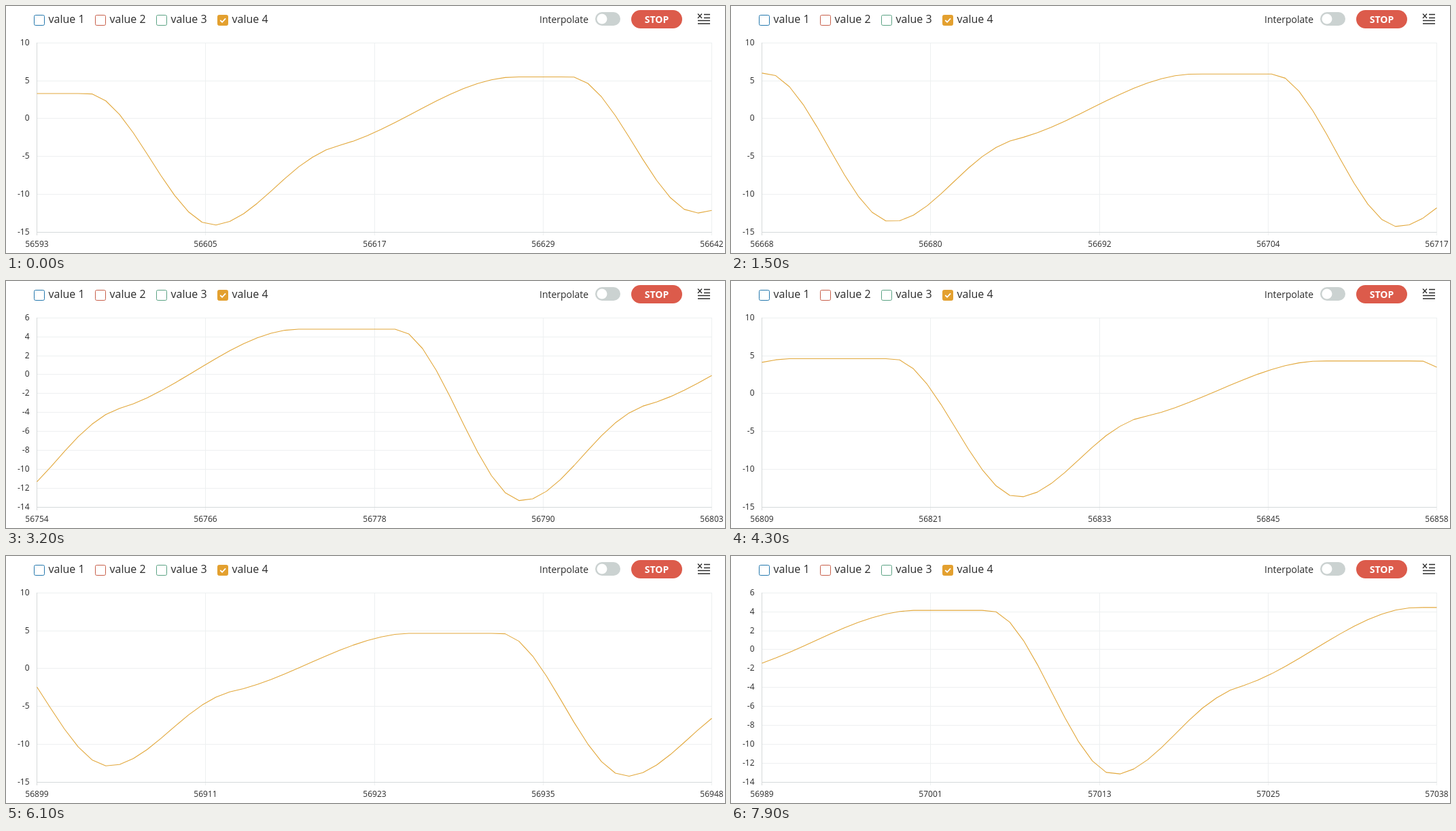
An HTML page for the animation above (8 s loop, 1058 by 364 pixels).

```html
<!DOCTYPE html>
<html lang="en">
<head>
<meta charset="utf-8">
<title>Live chart</title>
<style>
  html, body { margin: 0; width: 100%; height: 100%; overflow: hidden; background: #fff; }
  svg { display: block; font-family: "Open Sans", "Noto Sans", sans-serif; fill: #2b2b2b; }
  .box { fill: #fff; }
  .grid { stroke: #edf0f1; fill: none; }
  .axis { stroke: #d5d9da; fill: none; }
</style>
</head>
<body>
<svg width="1058" height="364" viewBox="0 0 1058 364">
  <g id="legend" font-size="16"></g>
  <text x="785" y="25" font-size="14">Interpolate</text>
  <rect x="867" y="9" width="37" height="20" rx="10" fill="#cbd2d1"/>
  <circle cx="877" cy="19" r="7.5" fill="#fff"/>
  <rect x="920" y="6" width="75" height="27" rx="13.5" fill="#dc5b4b"/>
  <text x="957.5" y="25" font-size="14" font-weight="700" text-anchor="middle" fill="#fff">STOP</text>
  <path d="M1018 11.5l6 6.5m0-6.5l-6 6.5M1027 12.5h9M1027 17.5h9M1018 21.5h18M1018 26h18" fill="none" stroke="#2b2b2b" stroke-width="1.3"/>
  <g id="chart" font-size="12"></g>
  <path id="curve" fill="none" stroke="#e2a83c" stroke-width="1.1" stroke-linejoin="round"/>
</svg>
<script>
const $ = id => document.getElementById(id);
const LEFT = 45.5, RIGHT = 1038.5, TOP = 54.3, HEIGHT = 278.7;
const FIRST = 56593, SHOWN = 50, STEP = 100, DURATION = 8000;

// Waves of the signal: sample of the dip after 56000, depth, shoulder level, plateau level.
const waves = [
  [568.5, -13.5, -4, 3.3],
  [605.8, -14.1, -4.1, 5.5],
  [640.9, -12.5, -3.9, 6],
  [677.4, -13.65, -3.2, 5.88],
  [714.2, -14.3, -3.5, 5.15],
  [751, -13.9, -4, 4.8],
  [789.2, -13.35, -3.65, 4.6],
  [827.6, -13.7, -3.5, 4.3],
  [865.9, -12.82, -3.6, 4.35],
  [904.2, -12.9, -3.4, 4.65],
  [941.8, -14.25, -4.3, 4.85],
  [978.2, -12, -2.5, 4.15],
  [1014.6, -13.2, -4.4, 4.45],
  [1051.5, -13, -4, 4.5]
];

// Smooth step from 0 to 1 that begins at `from` and takes `length` samples.
function ease(x, from, length) {
  const u = Math.max(0, Math.min(1, (x - from) / length));
  return u * u * (3 - 2 * u);
}

// Each wave climbs to its shoulder, then to its plateau, and drops into the next dip.
function level(sample) {
  const n = sample - 56000;
  const next = waves.findIndex(wave => wave[0] > n);
  const [start, dip, shoulder, plateau] = waves[next - 1];
  const [end, nextDip] = waves[next];
  return dip +
    (shoulder - dip) * ease(n, start, 9) +
    (plateau - shoulder) * ease(n, start + 7, 15) +
    (nextDip - plateau) * ease(n, end - 9.1, 9.1);
}

const text = (x, y, anchor, label) => `<text x="${x}" y="${y}" text-anchor="${anchor}">${label}</text>`;
const line = (cls, d) => `<path class="${cls}" d="${d}"/>`;

$('legend').innerHTML = ['#2478ad', '#c75f4a', '#5aa283', '#e3a02f'].map((color, i) => {
  const x = 41.5 + 90 * i;
  const on = i === 3;
  return `<rect class="box" x="${x}" y="13.5" width="15" height="15" rx="2" style="stroke:${color};${on ? `fill:${color}` : ''}"/>` +
    (on ? `<path d="M${x + 3.8} 21l2.8 2.8 5-5.4" fill="none" stroke="#fff" stroke-width="1.8"/>` : '') +
    text(x + 21, 25, 'start', `value ${i + 1}`);
}).join('');

function draw(step) {
  const start = FIRST + 5 * step + (step >= 25 ? 1 : 0);
  const values = Array.from({ length: SHOWN }, (_, i) => level(start + i));
  const wide = Math.max(...values) > 5.45 || Math.min(...values) < -13.45;
  const [low, high, gap] = wide ? [-15, 10, 5] : [-14, 6, 2];
  const toY = v => TOP + (high - v) / (high - low) * HEIGHT;

  let grid = '', axes = '', labels = '';
  for (let v = low; v <= high; v += gap) {
    const y = Math.round(toY(v) - 0.45) + 0.5;
    const d = `M${LEFT} ${y}H${RIGHT}`;
    if (v === low) axes += line('axis', d);
    else grid += line('grid', d);
    labels += text(34.5, y + 3.8, 'end', v);
  }
  for (let i = 0; i <= 4; i++) {
    const x = Math.floor(LEFT + (RIGHT - LEFT) * i / 4) + 0.5;
    const d = `M${x} 54V338`;
    if (i === 0) axes += line('axis', d);
    else grid += line('grid', d);
    labels += text(x, 355, 'middle', start + Math.floor((SHOWN - 1) * i / 4));
  }
  $('chart').innerHTML = grid + axes + labels;
  $('curve').setAttribute('d', 'M' + values.map((v, i) =>
    `${(LEFT + i * (RIGHT - LEFT) / (SHOWN - 1)).toFixed(2)} ${toY(v).toFixed(2)}`).join('L'));
}

let shown = -1;
function tick() {
  const step = Math.floor(performance.now() % DURATION / STEP);
  if (step !== shown) draw(shown = step);
  requestAnimationFrame(tick);
}
tick();
</script>
</body>
</html>
```
